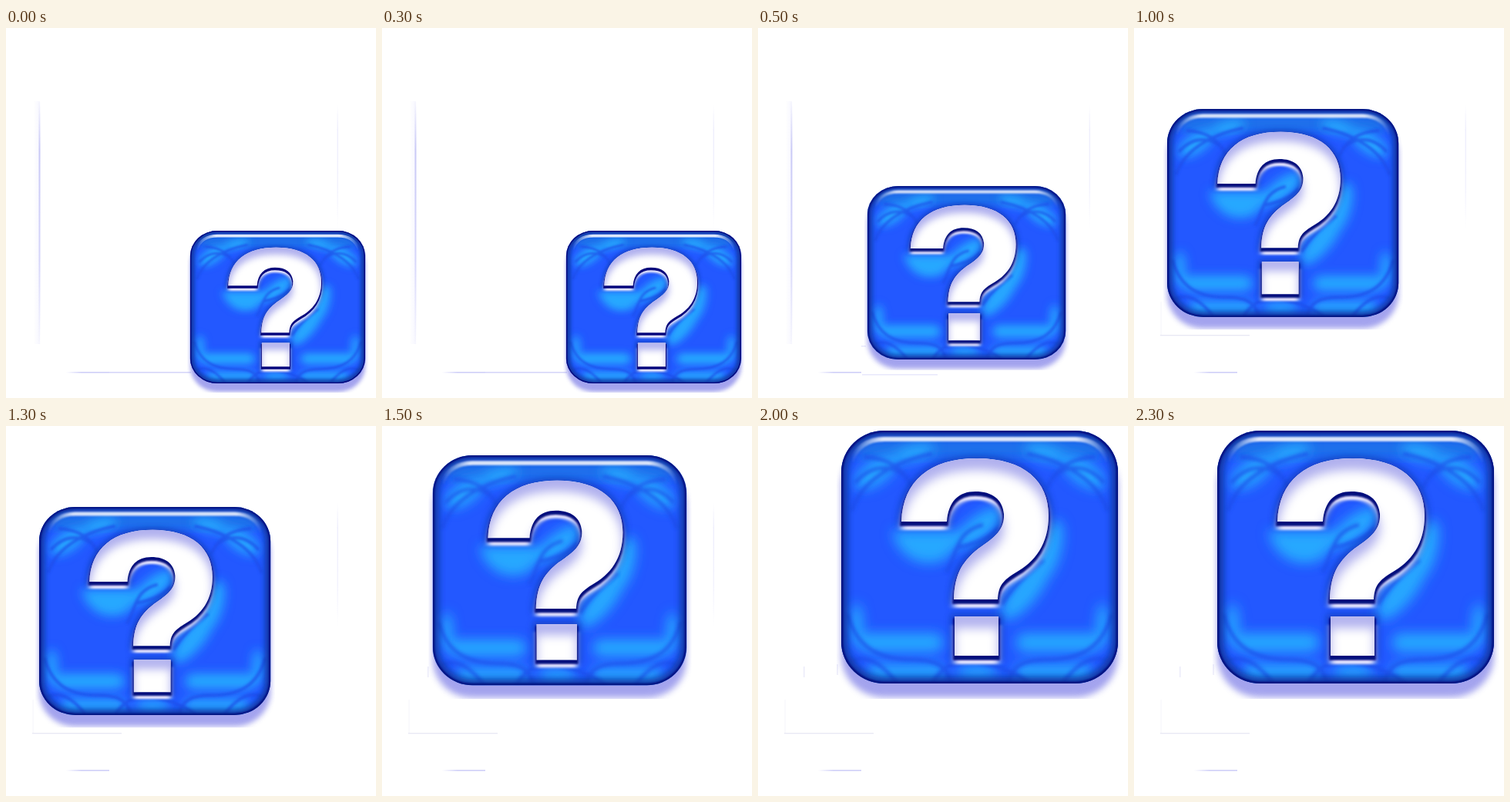
These frames come from a looping animation (480x480 px, 2500 ms). An HTML page:

```html
<!DOCTYPE html>
<html lang="en">
<head>
<meta charset="utf-8">
<title>Jumping question tile</title>
<style>
  html, body { margin: 0; width: 100%; height: 100%; overflow: hidden; background: #fff; }
  svg { display: block; width: 480px; height: 480px; }

  #tile, .trace { animation: 2.5s step-end infinite; }
  #tile { animation-name: jump; transform-origin: 0 0; }
  .start { animation-name: start; }
  .second { animation-name: second; }
  .early { animation-name: early; }
  .most { animation-name: most; }
  .later { animation-name: later; }
  .late { animation-name: late; }
  .last { animation-name: last; }

  /* the tile is drawn 359 x 328 and grows with each jump */
  @keyframes jump {
    0%   { transform: translate(239px, 263px) scale(.632, .604); }
    20%  { transform: translate(142px, 205px) scale(.716, .686); }
    40%  { transform: translate(43px, 105px) scale(.836, .823); }
    60%  { transform: translate(66px, 38px) scale(.916, .909); }
    80%, 100% { transform: translate(108px, 6px) scale(1, 1); }
  }
  @keyframes start  { 0% { opacity: 1 } 20%, 100% { opacity: 0 } }
  @keyframes second { 0% { opacity: 0 } 20% { opacity: 1 } 40%, 100% { opacity: 0 } }
  @keyframes early  { 0% { opacity: 1 } 40%, 100% { opacity: 0 } }
  @keyframes most   { 0% { opacity: 1 } 80%, 100% { opacity: 0 } }
  @keyframes later  { 0% { opacity: 0 } 40%, 100% { opacity: 1 } }
  @keyframes late   { 0% { opacity: 0 } 60%, 100% { opacity: 1 } }
  @keyframes last   { 0% { opacity: 0 } 80%, 100% { opacity: 1 } }
</style>
</head>
<body>
<svg viewBox="0 0 480 480">
  <defs>
    <linearGradient id="fadeY" x2="0" y2="1">
      <stop offset="0" stop-color="#c9c9f6" stop-opacity="0"/>
      <stop offset=".2" stop-color="#c9c9f6"/>
      <stop offset=".65" stop-color="#d6d6fa"/>
      <stop offset="1" stop-color="#d6d6fa" stop-opacity="0"/>
    </linearGradient>
    <linearGradient id="fadeX">
      <stop offset="0" stop-color="#cfcff8" stop-opacity="0"/>
      <stop offset=".35" stop-color="#cfcff8"/>
      <stop offset="1" stop-color="#cfcff8"/>
    </linearGradient>
    <linearGradient id="haze">
      <stop offset="0" stop-color="#e4e4fc" stop-opacity="0"/>
      <stop offset="1" stop-color="#e4e4fc"/>
    </linearGradient>
    <linearGradient id="shine">
      <stop offset="0" stop-color="#fff" stop-opacity="0"/>
      <stop offset=".12" stop-color="#fff"/>
      <stop offset=".88" stop-color="#fff"/>
      <stop offset="1" stop-color="#fff" stop-opacity="0"/>
    </linearGradient>

    <filter id="soft1" x="-20%" y="-20%" width="140%" height="140%"><feGaussianBlur stdDeviation="1.2"/></filter>
    <filter id="soft2" x="-20%" y="-20%" width="140%" height="140%"><feGaussianBlur stdDeviation="2.2"/></filter>
    <filter id="soft4" x="-20%" y="-20%" width="140%" height="140%"><feGaussianBlur stdDeviation="4.5"/></filter>
    <filter id="soft8" x="-20%" y="-20%" width="140%" height="140%"><feGaussianBlur stdDeviation="8"/></filter>
    <filter id="wide" x="-20%" y="-20%" width="140%" height="140%"><feGaussianBlur stdDeviation="4 1.5"/></filter>
    <filter id="inset" color-interpolation-filters="sRGB">
      <feOffset in="SourceAlpha" dy="15"/>
      <feGaussianBlur stdDeviation="7" result="inner"/>
      <feFlood flood-color="#b0b0ee"/>
      <feComposite in2="inner" operator="out"/>
      <feComposite in2="SourceAlpha" operator="in" result="shade"/>
      <feMerge><feMergeNode in="SourceGraphic"/><feMergeNode in="shade"/></feMerge>
    </filter>

    <rect id="box" width="359" height="328" rx="56" ry="54"/>
    <clipPath id="inside"><use href="#box"/></clipPath>
    <clipPath id="ground"><rect x="-6" y="-2" width="372" height="350"/></clipPath>

    <path id="mark" d="M78 118C80 65 115 36 176 36C238 36 269 66 269 110C269 147 252 170 225 185
      C207 196 204 204 203 219H146C147 190 154 172 178 153C200 138 212 128 211 108
      C209 89 196 79 174 79C152 79 139 92 137 118ZM147 241H204V292H147Z"/>
  </defs>

  <!-- faint traces left on the ground -->
  <g>
    <g class="trace early">
      <rect x="36" y="95" width="8" height="315" fill="url(#haze)" opacity=".35"/>
      <rect x="42.5" y="95" width="2" height="315" fill="url(#fadeY)"/>
    </g>
    <g opacity=".3">
      <rect class="trace most" x="429.5" y="100" width="1.5" height="160" fill="url(#fadeY)"/>
    </g>
    <rect x="78" y="446" width="56" height="1.6" fill="url(#fadeX)"/>
    <rect class="trace start" x="134" y="446" width="106" height="1.6" fill="#d6d6f9"/>
    <g class="trace second" fill="#e8e8fc">
      <rect x="135" y="449" width="98" height="1.5"/>
      <rect x="134" y="412" width="6" height="1.5"/>
    </g>
    <g class="trace later" fill="#e9e9f4">
      <rect x="34" y="398" width="116" height="1.4"/>
      <rect x="34.5" y="355" width="1.3" height="43" opacity=".35"/>
    </g>
    <rect class="trace late" x="59" y="312" width="1.5" height="14" fill="#ececfa"/>
    <rect class="trace last" x="102" y="309" width="2" height="14" fill="#f0f0fb"/>
  </g>

  <g id="tile">
    <g clip-path="url(#ground)">
      <use href="#box" y="18" fill="#8484e8" opacity=".75" filter="url(#soft4)"/>
    </g>
    <use href="#box" fill="#2358ff"/>

    <g clip-path="url(#inside)">
      <rect x="20" y="10" width="319" height="26" fill="#1a78e4" opacity=".8" filter="url(#soft8)"/>
      <g fill="#25a8ff" filter="url(#soft8)">
        <path d="M66 130H150C156 150 140 172 114 172C88 172 70 152 66 130Z"/>
        <ellipse cx="178" cy="126" rx="38" ry="15" transform="rotate(-38 178 126)"/>
        <ellipse cx="45" cy="54" rx="32" ry="15" transform="rotate(-35 45 54)"/>
        <ellipse cx="314" cy="54" rx="32" ry="15" transform="rotate(35 314 54)"/>
        <ellipse cx="94" cy="29" rx="28" ry="10" transform="rotate(-15 94 29)"/>
        <ellipse cx="265" cy="29" rx="28" ry="10" transform="rotate(15 265 29)"/>
        <ellipse cx="240" cy="206" rx="48" ry="17" transform="rotate(-52 240 206)"/>
        <ellipse cx="271" cy="155" rx="14" ry="40" transform="rotate(14 271 155)"/>
        <rect x="24" y="263" width="108" height="24" rx="11"/>
        <rect x="227" y="263" width="108" height="24" rx="11"/>
        <ellipse cx="20" cy="252" rx="8" ry="28"/>
        <ellipse cx="339" cy="252" rx="8" ry="28"/>
        <rect x="34" y="303" width="100" height="20" rx="9"/>
        <rect x="225" y="303" width="100" height="20" rx="9"/>
        <ellipse cx="176" cy="314" rx="28" ry="9"/>
      </g>

      <g fill="none" stroke="#1f4ee8" stroke-width="5" opacity=".7" filter="url(#soft2)">
        <path d="M14 104C24 70 60 42 118 30M30 34C62 36 80 48 92 74M18 68C38 44 66 42 86 62"/>
        <path d="M345 104C335 70 299 42 241 30M329 34C297 36 279 48 267 74M341 68C321 44 293 42 273 62"/>
        <path d="M8 238C20 280 46 297 92 297C122 297 137 304 142 327"/>
        <path d="M351 238C339 280 313 297 267 297C237 297 222 304 217 327"/>
        <path d="M12 299Q42 286 72 328M347 299Q317 286 287 328M118 328Q140 291 180 300T244 328"/>
        <path d="M136 184C152 160 146 132 184 122M150 152C168 148 190 142 204 126M208 225Q232 190 262 168"/>
      </g>

      <use href="#box" fill="none" stroke="#0c308f" stroke-width="17" opacity=".8" filter="url(#soft4)"/>
      <use href="#box" fill="none" stroke="#06077c" stroke-width="4.500" filter="url(#soft1)"/>
      <path d="M13 40C19 22 34 11 56 11H303C325 11 340 22 346 40" fill="none"
        stroke="url(#shine)" stroke-width="6" opacity=".85" filter="url(#soft1)"/>
    </g>

    <!-- raised bevel: light rim, dark edge, then the white face -->
    <use href="#mark" y="2" fill="#0c309c" stroke="#0c309c" stroke-width="10" opacity=".6" filter="url(#soft4)"/>
    <use href="#mark" y="11" fill="#e6e6ff" filter="url(#wide)"/>
    <use href="#mark" y="4" fill="#06077c" stroke="#06077c" stroke-width="3.500" filter="url(#soft1)"/>
    <use href="#mark" fill="#fff" filter="url(#inset)"/>
  </g>
</svg>
</body>
</html>
```
